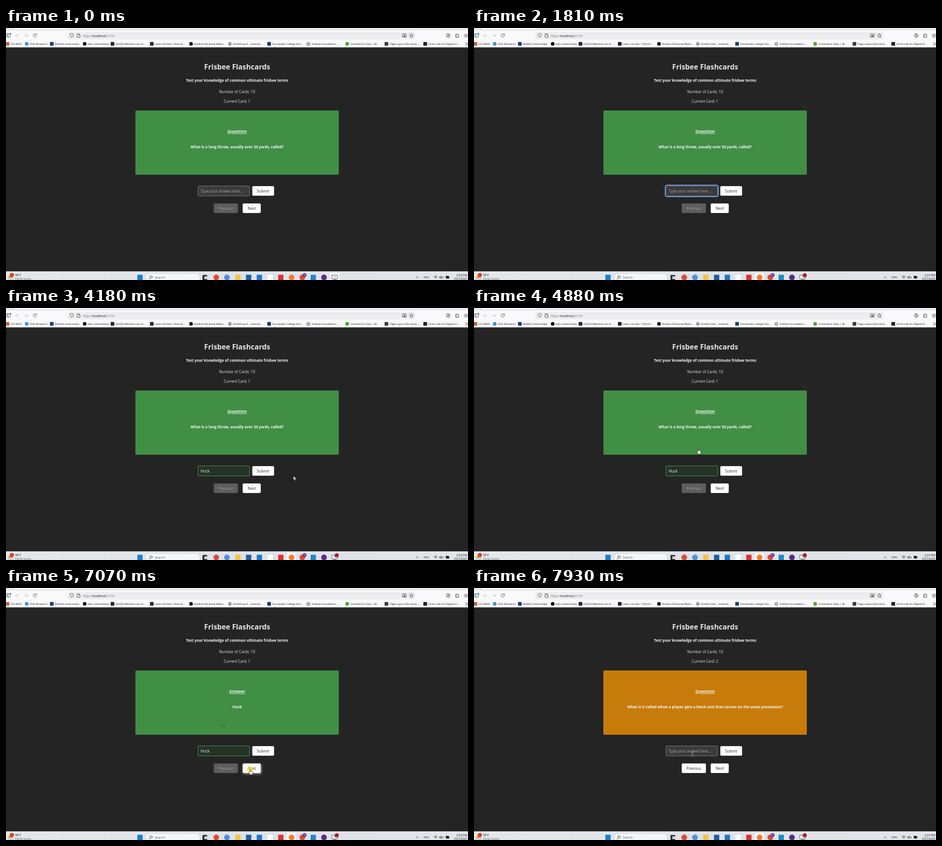
Write an HTML page that moves like this. It is 1012x553 px and loops after 8 s.

```html
<!DOCTYPE html>
<html lang="en">
<head>
<meta charset="utf-8">
<title>Frisbee Flashcards</title>
<style>
html, body { margin: 0; width: 100%; height: 100%; overflow: hidden; background: #242424; }
svg { display: block; width: 100vw; height: 100vh; }
text { font: 8.15px "Open Sans", "Noto Sans", sans-serif; white-space: pre; }
.mid { text-anchor: middle; }
.bold { font-weight: 700; font-size: 8.1px; }
.head { font-weight: 700; font-size: 9.4px; text-decoration: underline; }
.tiny { font-size: 6.2px; }
.line { fill: none; stroke: #3c3c42; stroke-width: .9; stroke-linecap: round; stroke-linejoin: round; }

/* Hard on/off switches: 1% = 80 ms */
.t { opacity: 0; animation: var(--k) 8s step-end infinite; }
.key { fill-opacity: 0; animation: var(--k) 8s step-end infinite; }
.fade { opacity: 0; animation: lift 8s linear infinite; }
#cursor { animation: move 8s linear infinite; }
#caret { animation: caretAt 8s step-end infinite; }

@keyframes badge { .75%, 100% { opacity: 1 } }
@keyframes recorder { 0% { opacity: 1 } 15%, 100% { opacity: 0 } }
@keyframes focus { 15%, 100% { opacity: 1 } }
@keyframes ring { 15% { opacity: 1 } 48.4%, 100% { opacity: 0 } }
@keyframes hint { 0% { opacity: 1 } 23.5% { opacity: 0 } 90.875%, 100% { opacity: 1 } }
@keyframes key1 { 23.5% { fill-opacity: 1 } 90.875%, 100% { fill-opacity: 0 } }
@keyframes key2 { 24.5% { fill-opacity: 1 } 90.875%, 100% { fill-opacity: 0 } }
@keyframes key3 { 25.5% { fill-opacity: 1 } 90.875%, 100% { fill-opacity: 0 } }
@keyframes key4 { 34% { fill-opacity: 1 } 90.875%, 100% { fill-opacity: 0 } }
@keyframes caret { 23.5% { opacity: 1 } 32.25% { opacity: 0 } 34% { opacity: 1 } 40.375%, 100% { opacity: 0 } }
@keyframes caretAt {
  0% { transform: translateX(433px) } 24.5% { transform: translateX(437.5px) }
  25.5% { transform: translateX(441.5px) } 34%, 100% { transform: translateX(446px) }
}
@keyframes correct { 36.875% { opacity: 1 } 90.875%, 100% { opacity: 0 } }
@keyframes question { 0% { opacity: 1 } 69.75%, 100% { opacity: 0 } }
@keyframes answer { 69.75% { opacity: 1 } 90.875%, 100% { opacity: 0 } }
@keyframes smudge { 75.375% { opacity: 1 } 90.875%, 100% { opacity: 0 } }
@keyframes second { 90.875%, 100% { opacity: 1 } }
@keyframes first { 0% { opacity: 1 } 90.875%, 100% { opacity: 0 } }
@keyframes nextHover { 81.5% { opacity: 1 } 96.2%, 100% { opacity: 0 } }
@keyframes lift { 0%, 61.1% { opacity: 0 } 63.5%, 76.9% { opacity: 1 } 79.5%, 100% { opacity: 0 } }
@keyframes click {
  15% { opacity: 1 } 16.5% { opacity: 0 } 47.25% { opacity: 1 } 48.5% { opacity: 0 }
  67.25% { opacity: 1 } 69.75% { opacity: 0 } 88.3% { opacity: 1 } 90.875%, 100% { opacity: 0 }
}
@keyframes arrow {
  .75% { opacity: 1 } 13% { opacity: 0 } 44% { opacity: 1 } 60.6% { opacity: 0 }
  76% { opacity: 1 } 81.5% { opacity: 0 } 96.2% { opacity: 1 } 98% { opacity: 0 }
}
@keyframes hand { 60.6% { opacity: 1 } 76% { opacity: 0 } 81.5% { opacity: 1 } 96.2%, 100% { opacity: 0 } }
@keyframes beam {
  13% { opacity: 1 } 22.5% { opacity: 0 } 43.625% { opacity: 1 } 44% { opacity: 0 } 98%, 100% { opacity: 1 }
}
@keyframes move {
  0%, .75% { transform: translate(987px, 420px) }
  2% { transform: translate(930px, 375px) }
  3.5% { transform: translate(820px, 338px) }
  5.5%, 9.25% { transform: translate(746px, 346px) }
  11% { transform: translate(665px, 350px) }
  13% { transform: translate(534px, 358px) }
  14%, 43.6% { transform: translate(512px, 357px) }
  44.3% { transform: translate(576px, 355px) }
  46.5% { transform: translate(622px, 362px) }
  48%, 51.875% { transform: translate(634px, 369px) }
  54% { transform: translate(610px, 366px) }
  57.375%, 60.125% { transform: translate(570px, 355px) }
  61% { transform: translate(491.5px, 309px) }
  62.75%, 75.375% { transform: translate(474.5px, 289px) }
  76.75% { transform: translate(416px, 339px) }
  78.5% { transform: translate(432px, 424px) }
  80.5% { transform: translate(500px, 412px) }
  82.5%, 95.875% { transform: translate(535px, 398px) }
  97.5% { transform: translate(505px, 378px) }
  99.1%, 100% { transform: translate(478.5px, 363.5px) }
}
</style>
</head>
<body>
<svg viewBox="0 0 1012 553">
  <defs>
    <filter id="soft" x="-10%" y="-20%" width="120%" height="140%"><feGaussianBlur stdDeviation="2.4"/></filter>
    <linearGradient id="bar"><stop stop-color="#e3e8ea"/><stop offset=".5" stop-color="#dce2e8"/><stop offset="1" stop-color="#e2e5ea"/></linearGradient>
  </defs>
  <rect width="1012" height="553" fill="#242424"/>

  <!-- Browser -->
  <rect width="1012" height="42.5" fill="#f9f9fb"/>
  <rect width="1012" height="5.5" fill="#eaeaed"/>
  <path d="M15.5 0V3.5" class="line" style="stroke:#c4c4c8"/>
  <rect x="17" y="-6" width="119" height="9.7" rx="2" fill="#fff" stroke="#c9c9cf" stroke-width=".6"/>
  <rect x="135.500" y="8.500" width="761" height="16.500" rx="2.500" fill="#ededf0"/>
  <g class="line">
    <rect x="1.500" y="12.500" width="8" height="7.500" rx="1.500"/><path d="M4.500 12.500v7.500"/>
    <path d="M28.500 16.500h-7.500m3-3l-3 3l3 3M40.500 16.500h7.500m-3-3l3 3l-3 3" stroke="#b9b9bf"/>
    <path d="M66.500 14.800a3.600 3.600 0 1 0 .2 2.800M66.900 12.800v2.400h-2.400"/>
    <path d="M144 12.500l3.300 1.200v2.600q-.3 3-3.300 4.400q-3-1.400-3.300-4.400v-2.600z"/>
    <path d="M156.200 12.700h3.500l2.500 2.500v5.200h-6zM159.700 12.700v2.500h2.500"/>
    <path d="M869 13h7.500v6.800h-7.500zM872.700 14.300v3.300m-1.500-1.400l1.500 1.500l1.500-1.500M870.500 18.600h4.500"/>
    <path d="M888 12.400l1.300 2.700l2.900.4l-2.100 2l.5 2.900l-2.600-1.400l-2.600 1.400l.5-2.900l-2.100-2l2.900-.4z"/>
    <circle cx="968.700" cy="16.500" r="4.200"/><circle cx="968.700" cy="15.300" r="1.400"/><path d="M966.300 19.200q2.400-2.400 4.800 0"/>
    <path d="M985 14.500h2v-1.500h1.800v1.500h3v6h-6.800v-2h1.500v-1.800h-1.500z"/>
    <path d="M1004 14h7M1004 16.700h7M1004 19.400h7M1006 32l2.700 3l-2.700 3M1009 32l2.700 3l-2.700 3"/>
  </g>
  <circle cx="9.500" cy="13" r="1.900" fill="#1a8ee8"/>
  <text x="168.500" y="19.700" style="font-size:7.1px" fill="#6e6e75">http://<tspan fill="#18181c">localhost</tspan>:5173</text>
  <g id="bookmarks" fill="#1b1b20"></g>

  <!-- Page -->
  <g class="mid" fill="#e6e6e6">
    <text x="506.300" y="91.300" style="font-size:15.75px;font-weight:700">Frisbee Flashcards</text>
    <text x="506.300" y="118" class="bold" fill="#f2f2f2">Test your knowledge of common ultimate frisbee terms</text>
    <text x="506.300" y="142.800">Number of Cards: 10</text>
    <text x="506" y="164" class="t" style="--k:first">Current Card: 1</text>
    <text x="506" y="164" class="t" style="--k:second">Current Card: 2</text>
  </g>
  <rect class="fade" x="284.500" y="184" width="446" height="140.500" rx="2" fill="#b7a8ba" fill-opacity=".8" filter="url(#soft)"/>
  <rect x="283.500" y="181" width="445.500" height="141" rx="2" fill="#418e45"/>
  <rect class="t" style="--k:second" x="283.500" y="181" width="445.500" height="141" rx="2" fill="#c77b0a"/>
  <g class="mid" fill="#f4f7f4">
    <g class="t" style="--k:question">
      <text x="506.300" y="230.300" class="head">Question</text>
      <text x="506.300" y="263.500" class="bold">What is a long throw, usually over 30 yards, called?</text>
    </g>
    <g class="t" style="--k:answer">
      <text x="506.300" y="230.300" class="head">Answer</text>
      <text x="506.300" y="263.500" class="bold">Huck</text>
    </g>
    <g class="t" style="--k:second">
      <text x="506.300" y="230.300" class="head">Question</text>
      <text x="506.300" y="263.500" class="bold">What is it called when a player gets a block and then scores on the same possession?</text>
    </g>
  </g>
  <path class="t" style="--k:smudge" d="M472.800 299.500q.8 3.800 4 3.800q3.800-.2 4-4" fill="none" stroke="#44584a" stroke-width="1.300"/>

  <!-- Answer field -->
  <rect x="420.500" y="346.500" width="113" height="22" rx="2" fill="#3b3b3b" stroke="#7c7c7c"/>
  <rect class="t" style="--k:correct" x="420.500" y="346.500" width="113" height="22" rx="2" fill="#263128" stroke="#43a047"/>
  <g class="t" style="--k:ring" fill="none">
    <rect x="418.700" y="344.700" width="116.600" height="25.600" rx="3.500" stroke="#e4efff" stroke-width=".9"/>
    <rect x="419.500" y="345.500" width="115" height="24" rx="3" stroke="#2f86f6" stroke-width="1.200"/>
  </g>
  <text class="t" style="--k:hint" x="426.500" y="360.800" fill="#a8a8a8">Type your answer here...</text>
  <text x="426.500" y="360.800" fill="#fff"><tspan class="key" style="--k:key1">H</tspan><tspan class="key" style="--k:key2">u</tspan><tspan class="key" style="--k:key3">c</tspan><tspan class="key" style="--k:key4">k</tspan></text>
  <g id="caret"><path class="t" style="--k:caret" d="M0 352.500v10.500" stroke="#fff" stroke-width=".8"/></g>

  <!-- Buttons -->
  <rect class="t" style="--k:nextHover" x="518.500" y="387" width="41" height="21" rx="3" fill="#b7a8ba" fill-opacity=".75" filter="url(#soft)"/>
  <g fill="#fff">
    <rect x="539.500" y="347" width="47.700" height="21" rx="2.500"/>
    <rect x="518.500" y="385" width="39.500" height="21" rx="2.500"/>
    <rect x="455" y="385" width="53" height="21" rx="2.500" fill="#5d5d5d"/>
    <rect class="t" style="--k:second" x="455" y="385" width="53" height="21" rx="2.500"/>
  </g>
  <g class="mid" fill="#2b2b2b">
    <text x="563.300" y="360.800">Submit</text>
    <text x="538.200" y="398.800">Next</text>
    <text x="481.500" y="398.800" class="t" style="--k:first" fill="#9b9b9b">Previous</text>
    <text x="481.500" y="398.800" class="t" style="--k:second">Previous</text>
  </g>

  <!-- Taskbar -->
  <rect y="534" width="1012" height="19" fill="url(#bar)"/>
  <circle cx="10" cy="547.500" r="5" fill="#f5a623"/>
  <path d="M4 553q0-4 4-4q2-3 5 0q3 0 3 4z" fill="#b9d3ea"/>
  <circle cx="12.800" cy="542" r="4.500" fill="#c42b1c"/>
  <text class="mid tiny" x="12.800" y="544.200" fill="#fff">2</text>
  <text class="tiny" x="19.500" y="545.300" fill="#1c1c1c">78°F</text>
  <text class="tiny" x="19.500" y="553.300" fill="#5a5f64">Partly sunny</text>
  <rect x="307" y="539" width="117" height="17" rx="8.500" fill="#f4f7f9" stroke="#cdd3d8" stroke-width=".6"/>
  <g class="line" style="stroke:#222"><circle cx="317.500" cy="546.500" r="2.900"/><path d="M315.400 548.800l-2.200 2.400"/></g>
  <text x="326" y="549.600" style="font-size:7px" fill="#5b5f63">Search</text>
  <rect x="430.500" y="542" width="10" height="11" fill="#2b2b2b"/><rect x="434.500" y="545" width="8" height="6" fill="#d5d8da"/>
  <rect class="t" style="--k:recorder" x="709.500" y="537.500" width="21" height="18" rx="2" fill="#f5f7f9"/>
  <rect class="t" style="--k:focus" x="614.500" y="537.500" width="21" height="18" rx="2" fill="#f1f4f7"/>
  <g id="apps"></g>
  <circle cx="654" cy="542.200" r="4.300" fill="#5a2d91"/>
  <text class="mid" x="654" y="544" style="font-size:5px" fill="#fff">M</text>
  <g class="line"><rect x="714" y="542.500" width="12" height="8" fill="#f8f8f8"/><path d="M717 552.500h6M718.500 546.500h3"/></g>
  <circle class="t" style="--k:badge" cx="724.500" cy="542.700" r="4.500" fill="#a81e26"/>
  <g class="line" style="stroke:#222">
    <path d="M898 548.500l2.700-2.800l2.700 2.800"/>
    <path d="M937.500 545.500q3.700-3.300 7.400 0M938.800 547.300q2.400-2 4.800 0M940.200 549q1-.8 2 0"/>
    <path d="M950 546h1.500l2-1.800v6l-2-1.800h-1.500zM955.500 546l2.500 2.500m0-2.500l-2.500 2.500"/>
    <rect x="964" y="544.500" width="6" height="5" rx="1" fill="#222"/><path d="M971.200 546v2M963.500 544v2.500"/>
  </g>
  <g fill="#1c1c1c">
    <text class="tiny" x="915" y="549.400" style="font-size:6px">ENG</text>
    <text class="tiny" x="1010" y="545.200" text-anchor="end">2:23 PM</text>
    <text class="tiny" x="1010" y="553.400" text-anchor="end">10/7/2025</text>
  </g>

  <!-- Pointer, hot spot at 0,0 -->
  <g id="cursor">
    <circle class="t" style="--k:click" r="6.700" fill="#f6e51d" fill-opacity=".72"/>
    <path class="t" style="--k:arrow" d="M0 0v9.300l2.200-2l1.500 3.400l1.600-.7l-1.500-3.300h2.900z" fill="#fff" stroke="#111" stroke-width=".7"/>
    <path class="t" style="--k:hand" d="M-1 6.500V.8q1-1.300 2 0v3.700q1-.7 1.700.2q1-.5 1.600.4q1.200-.2 1.200 1v2.200q-.2 2-1.300 3.400h-4.200l-3.300-4.200q-.2-1.500 1.200-1z" fill="#fff" stroke="#111" stroke-width=".7"/>
    <path class="t" style="--k:beam" d="M-1.800-4.500h1.300l.5.500l.5-.5h1.300M0-4v8.500M-1.800 5h1.300l.5-.5l.5.500h1.300" fill="none" stroke="#d6d6d6" stroke-width=".8"/>
  </g>
</svg>
<script>
const NS = "http://www.w3.org/2000/svg";

function add(parent, tag, attrs, content = "") {
  const node = document.createElementNS(NS, tag);
  for (const name in attrs) node.setAttribute(name, attrs[name]);
  node.textContent = content;
  parent.append(node);
}

// A plain dot or block stands for each site or app.
function icon(parent, shape, x, y, r, fill) {
  if (shape === "dot") add(parent, "circle", { cx: x, cy: y, r, fill });
  else add(parent, "rect", { x: x - r, y: y - r, width: 2 * r, height: 2 * r, rx: .6, fill });
}

const bookmarks = [
  ["block", "#b8683a", "CIS 4600"],
  ["dot", "#3b93d6", "VUK Research"],
  ["block", "#143c78", "Brellick Internships"],
  ["dot", "#141414", "Varn Internships"],
  ["block", "#1f2636", "[2022] Massive List of ..."],
  ["block", "#1f2636", "Learn Orchel • Find th..."],
  ["dot", "#16181c", "Nodlux Personal Webs..."],
  ["dot", "#9aa0a8", "OrbelCoach - Intervie..."],
  ["block", "#1f3a70", "Tunnevale College Sch..."],
  ["globe", "#55555c", "Trellow Foundation ..."],
  ["dot", "#45a531", "Commerce Clips | M..."],
  ["block", "#3a3a3a", "Page Layout Bursarie..."],
  ["block", "#222222", "Orvin Lab for Digital H..."]
];
const bookmarkX = [10, 52, 107, 179, 240, 326, 412, 497, 583, 669, 754, 840, 925];
const shelf = document.getElementById("bookmarks");
bookmarks.forEach(([shape, fill, label], i) => {
  const x = bookmarkX[i], cx = x - 6.7;
  if (shape === "globe") {
    add(shelf, "path", {
      d: `M${cx - 3.7} 35a3.700 3.700 0 1 0 7.400 0a3.700 3.700 0 1 0-7.400 0h7.400M${cx} 31.300q-3.500 3.700 0 7.400q3.500-3.700 0-7.400`,
      fill: "none", stroke: fill, "stroke-width": .7
    });
  } else icon(shelf, shape, cx, 34.8, 4, fill);
  add(shelf, "text", { x, y: 37.2, style: "font-size:6.05px" }, label);
});

const apps = [
  [293.5, "block", "#1382d8"], [460.5, "dot", "#dc4a3c"], [484, "dot", "#4b92d8"],
  [508, "block", "#f6c244"], [531.5, "block", "#1d5f9f"], [555, "block", "#1878cf"],
  [578.5, "block", "#ffffff"], [602, "block", "#e2302c"], [625.5, "dot", "#fb7a22"],
  [649, "dot", "#dc4a3c"], [673, "block", "#2187d0"], [696.5, "dot", "#5b2b88"]
];
const dock = document.getElementById("apps");
for (const [x, shape, fill] of apps) icon(dock, shape, x, 547.3, shape === "dot" ? 6.2 : 5.8, fill);
</script>
</body>
</html>
```
